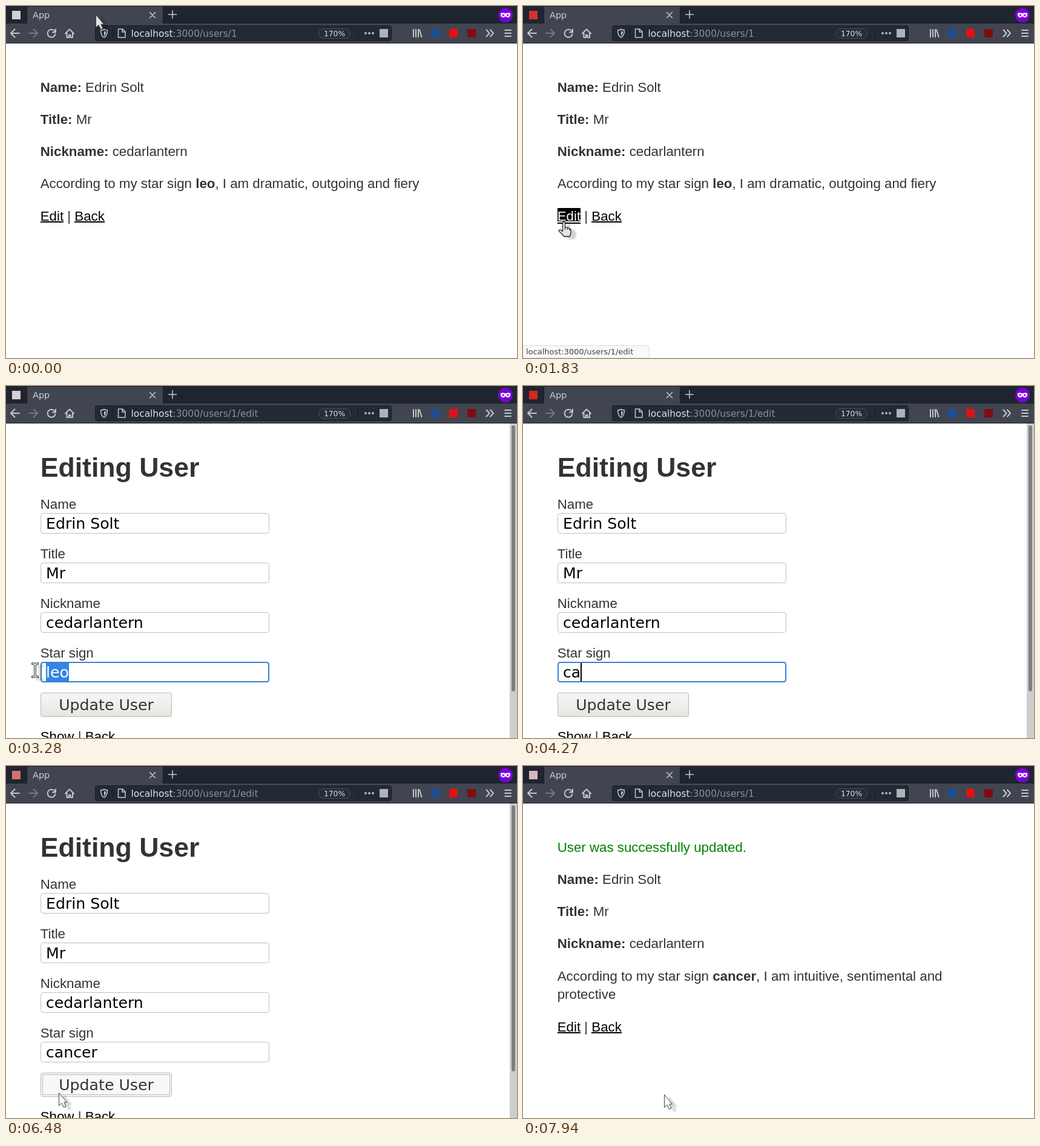
An HTML page for the animation above (8 s loop, 844 px wide and 582 px high).

```html
<!DOCTYPE html>
<html lang="en">
<head>
<meta charset="utf-8">
<title>App</title>
<style>
html, body { margin: 0; width: 100%; height: 100%; overflow: hidden; background: #fff; }
svg { display: block; width: 844px; height: 582px; }
text { white-space: pre; }
.page { font: 22.3px "Liberation Sans", Arial, sans-serif; fill: #333; }
.title { font-size: 44.6px; }
.b { font-weight: bold; }
.link { fill: #000; }
.ui { font-family: "DejaVu Sans", Verdana, sans-serif; }
.input { font: 25.2px "DejaVu Sans", Verdana, sans-serif; fill: #000; }
.icon { fill: none; stroke: #c3c7cd; stroke-width: 2; stroke-linecap: round; stroke-linejoin: round; }
.thin { stroke-width: 1.5; }
.dim { stroke: #737882; }
#cursor { filter: drop-shadow(8px 4px 1px rgba(0, 0, 0, .18)); }
</style>
</head>
<body>
<svg viewBox="0 0 844 582">
  <defs>
    <linearGradient id="face" x2="0" y2="1">
      <stop stop-color="#f7f7f5"/><stop offset="1" stop-color="#e5e5e1"/>
    </linearGradient>
    <path id="bar" d="M-4-11Q0-11 0-8V8Q0 11-4 11M4-11Q0-11 0-8M4 11Q0 11 0 8"/>
  </defs>
  <rect width="844" height="582" fill="#fff"/>

  <g id="show" class="page"></g>
  <g id="edit" class="page"></g>
  <g id="done" class="page"></g>

  <g id="status" class="ui" font-size="13">
    <path d="M0 561.5H205.5Q208.5 561.5 208.5 564.5V582H0Z" fill="#f9f9fa" stroke="#ddd"/>
    <text x="5" y="576" fill="#444">localhost:3000/users/1/edit</text>
  </g>

  <g class="ui">
    <rect width="844" height="29" fill="#1f2530"/>
    <rect y="29" width="844" height="33" fill="#404550"/>
    <rect y="61" width="844" height="1" fill="#20252e"/>
    <rect x="34" width="226" height="29" fill="#191e27"/>
    <rect x="35" y="1" width="224" height="28" fill="#404550"/>
    <rect id="favicon" x="10" y="8" width="14" height="14"/>
    <text x="44" y="20" font-size="14.5" fill="#cdd1d7">App</text>
    <path class="icon thin" d="M237.500 10.500l9 9m0-9l-9 9M268.500 14h13m-6.500-6.500v13"/>

    <circle cx="825" cy="15" r="12" fill="#7b00d6"/>
    <path d="M817 12q4-1.500 8 .5q4-2 8-.5q.5 7-4 7q-2.500 0-4-2.500q-1.500 2.500-4 2.500q-4.500 0-4-7Z" fill="#fff"/>
    <ellipse cx="821.300" cy="15" rx="2" ry="1.300" fill="#7b00d6"/>
    <ellipse cx="828.700" cy="15" rx="2" ry="1.300" fill="#7b00d6"/>

    <path class="icon" d="M22 45H8m6.500-6.500L8 45l6.500 6.500"/>
    <path class="icon dim" d="M38 45h14m-6.500-6.500L52 45l-6.500 6.500"/>
    <path class="icon" d="M80.500 41.500a6.500 6.500 0 1 0 1 5M82 38.500v5h-5"/>
    <path class="icon" d="M98 45.500l7-7 7 7M100.500 45v7h3.500v-4h2.500v4h3.500v-7"/>

    <rect x="147.500" y="32.500" width="489" height="25" rx="3" fill="#232a34" stroke="#191f28"/>
    <path class="icon thin" d="M162 38.500q3 1.500 5.500 1.500q0 9-5.500 12q-5.500-3-5.500-12q3 0 5.500-1.500Z"/>
    <path d="M162 41.500q2 1 3 1q0 4.500-3 7Z" fill="#c3c7cd"/>
    <path d="M176.500 37v17M581.500 37v17" stroke="#151a22"/>
    <path class="icon thin" d="M185.500 38h7l4.500 4.500V52h-11.500ZM192 38v5h5"/>
    <text x="206.500" y="51" font-size="15.4" fill="#8b9199"><tspan fill="#dde1e7">localhost</tspan><tspan id="url"></tspan></text>
    <rect x="516.500" y="37.500" width="52" height="16" rx="8" fill="#262d37" stroke="#4b525c"/>
    <text x="542.500" y="50" font-size="12.3" text-anchor="middle" fill="#dde1e7">170%</text>
    <g fill="#aeb3ba">
      <circle cx="594" cy="45" r="2"/><circle cx="600" cy="45" r="2"/><circle cx="606" cy="45" r="2"/>
      <rect x="617" y="38" width="14" height="14"/>
    </g>
    <path class="icon" stroke-linecap="butt" d="M673 39v12M677 39v12M681 39v12M683 39.500l3.500 11.500"/>
    <circle cx="709" cy="45" r="8" fill="#1d4e93"/>
    <rect x="732" y="38" width="14" height="14" fill="#e21212"/>
    <rect x="762" y="38" width="14" height="14" fill="#800c10"/>
    <path class="icon" d="M793.500 39.500l5 5.500-5 5.500m6.500-11l5 5.500-5 5.500M824 40h10m-10 5h10m-10 5h10"/>
  </g>

  <g id="cursor">
    <path id="arrow" d="M.5.5V21.500L5 17.500 8.500 24.500 12 23 8.800 16H13.500Z" fill="#fff" fill-opacity=".86" stroke="#444"/>
    <path id="hand" transform="translate(-4)" d="M7.500 13V3a2 2 0 0 1 4 0v7q3-1 4 1q3-.8 3.500 1.500q2 0 2 2v4q0 3-2 6.500H9.500q-2-4-7.500-8q-1.500-2 .5-3q2 0 5 2.500Z M11.500 10v4m4-3v3m3.500-1.500v2.500" fill="#e6e6e6" stroke="#222" stroke-width="1.300"/>
    <g id="beam" fill="none" stroke-linecap="square">
      <use href="#bar" stroke="#222" stroke-width="3.600"/>
      <use href="#bar" stroke="#fff" stroke-width="1.600"/>
    </g>
  </g>
</svg>
<script>
const $ = id => document.getElementById(id);
const NAME = 'Edrin Solt', NICK = 'cedarlantern', X = 56.7;
const LOOP = 8000, STEP = 96.7;

const line = (y, s, attrs = '') => `<text x="${X}" y="${y}" ${attrs}>${s}</text>`;
const bold = s => `<tspan class="b">${s}</tspan>`;
const links = (y, first, x2) => `
  <text x="${X}" y="${y}"><tspan class="link">${first}</tspan> | <tspan class="link">Back</tspan></text>
  <path d="M57 ${y + 2}H${x2 - 18}M${x2} ${y + 2}h50" stroke="#000" stroke-width="2"/>`;
const details = y =>
  line(y, bold('Name:') + ' ' + NAME) +
  line(y + 53, bold('Title:') + ' Mr') +
  line(y + 106, bold('Nickname:') + ' ' + NICK);

const field = (label, value, i) => {
  const y = 210 + 82 * i;
  return line(y - 7, label) +
    `<rect x="57.500" y="${y + .5}" width="377" height="33" rx="4" fill="#fff" stroke="#bfbfbf"/>` +
    `<text class="input" x="66" y="${y + 26}">${value}</text>`;
};

$('show').innerHTML = details(142) +
  line(301, `According to my star sign ${bold('leo')}, I am dramatic, outgoing and fiery`) +
  links(355, 'Edit', 113) +
  `<g id="hover"><rect x="57" y="334" width="38" height="26" fill="#000"/>
   ${line(355, 'Edit', 'fill="#fff"')}<path d="M57 357h38" stroke="#fff" stroke-width="2"/></g>`;

$('edit').innerHTML =
  line(150, 'Editing User', 'class="title b"') +
  [['Name', NAME], ['Title', 'Mr'], ['Nickname', NICK], ['Star sign', '']]
    .map(([label, value], i) => field(label, value, i)).join('') +
  `<rect id="focus" x="58" y="457" width="376" height="32" rx="3.500" fill="none" stroke="#3a80d2" stroke-width="2"/>
   <rect id="select" x="66" y="458" height="30" fill="#3584e4"/>
   <text id="sign" class="input" x="66" y="482"></text>
   <rect id="caret" y="458" width="2" height="30" fill="#000"/>
   <rect id="button" x="57.500" y="507.500" width="216" height="39" rx="3" stroke="#b9b9b3"/>
   <rect id="dots" x="60.500" y="510.500" width="210" height="33" fill="none" stroke="#777" stroke-dasharray="1"/>
   <text class="input" x="165.500" y="536" text-anchor="middle" style="fill:#333">Update User</text>
   ${links(587, 'Show', 131)}
   <rect x="832" y="62" width="12" height="520" fill="#cecece"/>
   <rect x="835" y="65" width="6" height="440" rx="3" fill="#7e8183"/>`;

$('done').innerHTML = line(142, 'User was successfully updated.', 'fill="#008000"') +
  details(195) +
  line(355, `According to my star sign ${bold('cancer')}, I am intuitive, sentimental and`) +
  line(385, 'protective') + links(439, 'Edit', 113);

// Pointer path: time, x, y
const path = [
  [0, 148, 14], [200, 148, 14], [480, 168, 70], [770, 150, 170], [1060, 108, 288],
  [1340, 62, 356], [2610, 62, 356], [2800, 84, 420], [2950, 112, 471], [3000, 112, 471],
  [3270, 49, 470], [3380, 45, 471], [3470, 28, 473], [5800, 28, 473],
  [6190, 62, 556], [6470, 86, 540], [6670, 98, 536], [7260, 112, 532], [7470, 112, 532],
  [7920, 233, 543], [8000, 233, 543]
];
const keys = [4070, 4270, 4460, 4660, 4860, 5130];
const advance = [0, .55, 1.163, 1.797, 2.347, 2.962, 3.373];
const LOAD_EDIT = 2030, LOAD_DONE = 7060;
const PULSE = 2850;

const within = (t, a, b) => t >= a && t < b;
const toggle = (id, on) => { $(id).style.display = on ? '' : 'none'; };
const mix = (a, b, k) => a + (b - a) * k;

function pointerAt(t) {
  const i = Math.max(1, path.findIndex(p => p[0] > t));
  const [a, b] = [path[i - 1], path[i]];
  const k = (t - a[0]) / (b[0] - a[0]);
  return [mix(a[1], b[1], k), mix(a[2], b[2], k)];
}

// Tab icon turns red and back once per pulse
function iconColour(t) {
  const away = Math.abs((t + 25) % PULSE - PULSE / 2);
  const red = Math.min(1, Math.max(0, (900 - away) / 500));
  return `rgb(${mix(214, 212, red)},${mix(207, 38, red)},${mix(209, 30, red)})`;
}

function draw(t) {
  const q = Math.floor((t + 15) / STEP) * STEP;
  const editing = within(t, LOAD_EDIT, LOAD_DONE);
  toggle('show', t < LOAD_EDIT);
  toggle('edit', editing);
  toggle('done', t >= LOAD_DONE);
  $('url').textContent = ':3000/users/1' + (editing ? '/edit' : '');
  $('favicon').setAttribute('fill', iconColour(q));

  const [x, y] = pointerAt(q);
  const hand = within(t, 1340, LOAD_EDIT);
  const beam = within(t, 2890, 3440);
  toggle('cursor', !within(t, 3750, 5900));
  toggle('arrow', !hand && !beam);
  toggle('hand', hand);
  toggle('beam', beam);
  $('cursor').setAttribute('transform', `translate(${Math.round(x)} ${Math.round(y)})`);
  toggle('hover', hand);
  toggle('status', within(t, 1530, LOAD_EDIT));

  const typed = keys.filter(k => t >= k).length;
  const selected = within(t, 3080, keys[0]);
  const w = t < 3270 ? Math.min(38, Math.max(0, 104 - x)) : 38;
  toggle('select', selected);
  $('select').setAttribute('x', 104 - w);
  $('select').setAttribute('width', w);
  $('sign').textContent = typed ? 'cancer'.slice(0, typed) : 'leo';
  $('sign').style.fill = selected && w > 20 ? '#fff' : '#000';
  toggle('focus', within(t, 2980, 5530));
  toggle('caret', within(t, keys[0], 5530));
  $('caret').setAttribute('x', Math.round(66 + advance[typed] * 25.2));
  toggle('dots', t >= 5530);
  $('button').setAttribute('fill', t >= 6370 ? '#f8f8f7' : 'url(#face)');
}

const start = performance.now();
function tick() {
  draw((performance.now() - start) % LOOP);
  requestAnimationFrame(tick);
}
tick();
</script>
</body>
</html>
```
